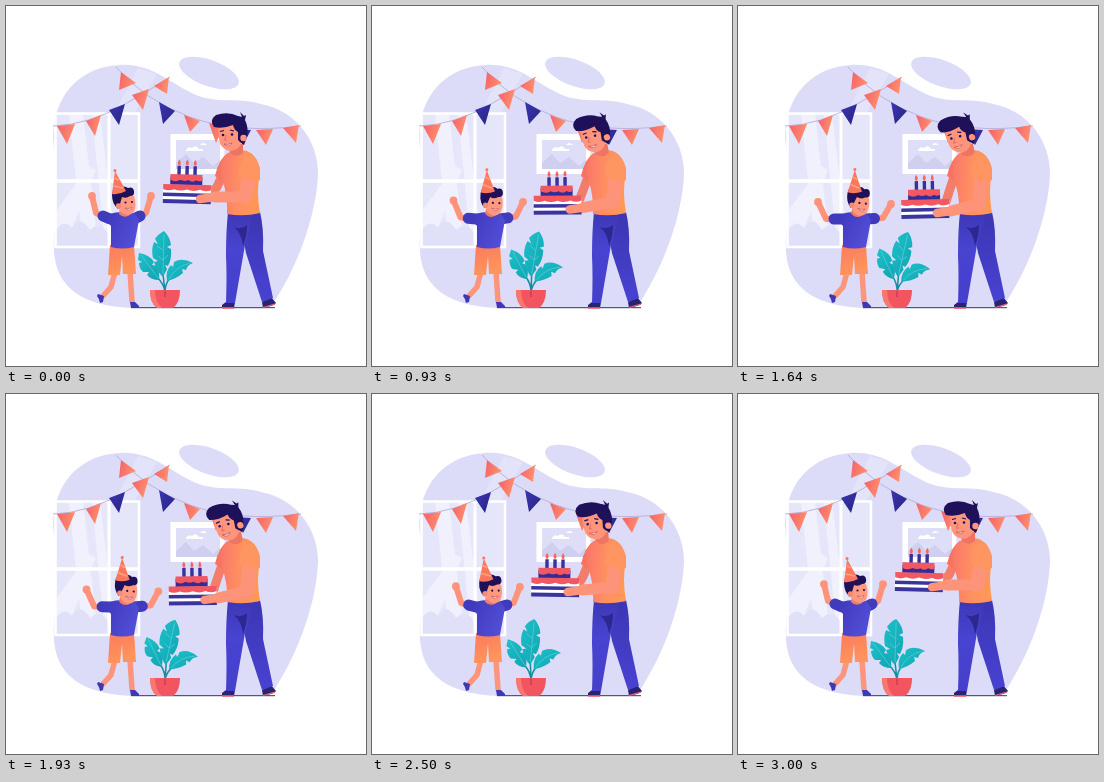
An HTML page that plays this animation: 360x360 px, repeating every 3.07 s.

```html
<!DOCTYPE html>
<html lang="en">
<head>
<meta charset="utf-8">
<title>Birthday cake</title>
<style>
html, body { margin: 0; width: 100%; height: 100%; overflow: hidden; background: #fff; }
svg { display: block; width: 100vw; height: 100vh; }
.limb { fill: none; stroke-linecap: round; stroke-linejoin: round; }
</style>
</head>
<body>
<svg viewBox="0 0 360 360">
  <defs>
    <linearGradient id="shirt" x1="0" y1="0.2" x2="1" y2="0.3">
      <stop offset="0" stop-color="#f9776a"/><stop offset=".5" stop-color="#ff8f61"/><stop offset="1" stop-color="#ff9857"/>
    </linearGradient>
    <linearGradient id="flag" x1="0" y1="0" x2="1" y2="0.3">
      <stop offset="0" stop-color="#f4606a"/><stop offset="1" stop-color="#ff8e6c"/>
    </linearGradient>
    <linearGradient id="navy" x1="0" y1="0" x2="1" y2="1">
      <stop offset="0" stop-color="#3b35b4"/><stop offset="1" stop-color="#29247f"/>
    </linearGradient>
    <linearGradient id="frontLeg" x1="0" y1="0" x2="0" y2="1">
      <stop offset="0" stop-color="#3d37b6"/><stop offset=".4" stop-color="#4843d0"/><stop offset="1" stop-color="#4540cc"/>
    </linearGradient>
    <linearGradient id="backLeg" x1="0" y1="0" x2="0" y2="1">
      <stop offset="0" stop-color="#3c36b3"/><stop offset="1" stop-color="#4842d2"/>
    </linearGradient>
    <linearGradient id="kidShirt" x1="0" y1="0" x2="1" y2="0.5">
      <stop offset="0" stop-color="#3d38bb"/><stop offset="1" stop-color="#524dd6"/>
    </linearGradient>
    <linearGradient id="shorts" x1="0" y1="0" x2="0.3" y2="1">
      <stop offset="0" stop-color="#fb7a5d"/><stop offset="1" stop-color="#ff955c"/>
    </linearGradient>
    <linearGradient id="teal" x1="0" y1="0" x2="1" y2="1">
      <stop offset="0" stop-color="#1cc0c8"/><stop offset="1" stop-color="#12a5b3"/>
    </linearGradient>
    <clipPath id="panes"><rect x="50" y="108" width="82" height="133"/></clipPath>
  </defs>

  <path fill="#dcdcf8" d="M48 120C52 86 76 61 113 59C147 57 164 78 190 89C213 98 232 91 255 98C288 104 312 133 312 167C311 207 292 262 264 302H128C90 301 51 290 48 246C46 219 55 197 53 171C51 151 45 138 48 120Z"/>
  <ellipse cx="203" cy="67" rx="31.5" ry="13" transform="rotate(20 203 67)" fill="#dcdcf8"/>
  <path fill="#e3e3fa" d="M132 62L151 68L128 108H108Z"/>

  <g id="window">
    <rect x="50" y="108" width="82" height="133" fill="#e6e6fa"/>
    <g clip-path="url(#panes)">
      <path fill="#f1f1fd" d="M63 108H77L92 241H77ZM86 108H94L110 241H99ZM50 205L83 160L90 164L58 241H50Z"/>
      <path fill="#e0e0f8" d="M50 241V224Q58 212 66 222Q74 208 84 224Q94 214 102 227L106 241Z"/>
    </g>
    <g fill="none" stroke="#fff">
      <rect x="49.5" y="107.5" width="83.5" height="133.5" stroke-width="2.5"/>
      <path d="M103 108V241" stroke-width="3"/>
      <path d="M49 175H133" stroke-width="3.5"/>
    </g>
  </g>

  <g id="picture">
    <rect x="164.500" y="128" width="54" height="40" fill="#fff"/>
    <rect x="170" y="134" width="44" height="29" fill="#dedef8"/>
    <path fill="#cfcff0" d="M170 163V157L180 148L188 157L197 151L207 160L214 154V163Z"/>
    <path fill="#fff" d="M180 144q2-4 6-2q4-4 7 1h4v2h-17zM194 139q3-4 7 0z"/>
  </g>

  <path fill="none" stroke="#b8b6dc" stroke-width="1" d="M47 120Q82 119 119 98T164 71M110 61Q138 94 184 111T295 120"/>
  <g id="flags"></g>

  <path d="M125 301.700H269" stroke="#393469" stroke-width="1"/>

  <g id="plant">
    <path class="limb" stroke="#128f9f" stroke-width="1.500" d="M159 286L157 268M159 286Q158 278 151 271M159 286Q159 278 164 272"/>
    <g fill="url(#teal)">
      <path d="M133 247Q144 249 148 256L146 259L151 260Q154 267 153 274Q145 274 141 269L143 266L137 266Q133 262 133 257L136 256L132 254Z"/>
      <path d="M161 275Q159 265 165 259L167 261L168 256Q176 251 187 257Q181 259 180 264L176 263L177 267Q170 273 161 275Z"/>
      <path d="M158 225Q164 231 165 239L161 241L165 243Q166 253 162 260L159 259L161 263L157 271Q151 266 148 256L152 255L147 252Q145 243 148 236L152 238L149 233Q152 228 158 225Z"/>
    </g>
    <path fill="none" stroke="#63d5da" stroke-width=".6" d="M135 249L152 272M163 273Q169 261 184 257M158 228L157 268M157 244L151 240M157 254L152 250M157 254L162 249"/>
  </g>
  <path fill="#f2555f" d="M144 284H174Q174 297 167 302H151Q144 297 144 284Z"/>
  <path fill="#fa7770" d="M144 284H149Q149 296 156 302H151Q144 297 144 284Z"/>
  <path stroke="#cb3e58" d="M159 285V291" stroke-width="1.500"/>

  <g id="kid">
    <path class="limb" stroke="#fd957c" stroke-width="5.500" d="M109 266L105 281L97 290"/>
    <path class="limb" stroke="#fd957c" stroke-width="5.500" d="M124 266L126 295"/>
    <path fill="#3d38b4" d="M92 288L98 290L97 296L94 297Q93 292 91 290ZM124 296H129L133 300V302H125Z"/>
    <path fill="url(#shorts)" d="M104 239H128L130 268H117L116 250L114 269H102Z"/>
    <path id="kidLeft" class="limb" stroke="#fd937a" stroke-width="6"/>
    <path id="kidRight" class="limb" stroke="#fd937a" stroke-width="6"/>
    <path id="kidSleeves" class="limb" stroke="#403bbd" stroke-width="11" stroke-linecap="butt"/>
    <path fill="url(#kidShirt)" d="M103 208Q117 204 129 208L133 214L128 241Q116 244 105 241V220L99 213Z"/>
    <circle id="fistLeft" r="3.900" fill="#fd937a"/>
    <circle id="fistRight" r="3.900" fill="#fd937a"/>
    <g id="kidHead">
      <path fill="#f27b67" d="M114 201H124V209Q118 213 113 208Z"/>
      <path fill="#ff9a80" d="M111 190Q121 186 128 190Q131 199 128 206Q122 212 115 206Q110 200 111 190Z"/>
      <path fill="#1f1159" d="M106 189Q106 181 113 182Q118 179 122 182Q127 180 128 185Q129 190 124 190Q120 193 116 191L114 198L112 203Q106 198 106 189Z"/>
      <circle cx="112.500" cy="200" r="2.700" fill="#f78a72"/>
      <g fill="#1f1159"><circle cx="119.500" cy="196.500" r="1.100"/><circle cx="126" cy="196" r="1.100"/></g>
      <path fill="#fff" stroke="#bd4058" stroke-width=".6" d="M119 202Q123 203.500 126 201.500Q124 206.500 119 202Z"/>
      <path fill="#fb765f" d="M109 165L120 185Q113 189 106 188Z"/>
      <path stroke="#ffa376" stroke-width="1.700" d="M108.500 172L113 174M107.500 180L117 182"/>
      <circle cx="109" cy="164.500" r="1.500" fill="#fa7464"/>
    </g>
  </g>

  <g id="dad">
    <path fill="#292471" d="M216 299L220 296H229L228 302H216ZM256 296L265 291L270 297L268 299L257 302Z"/>
    <path stroke="#f4636b" stroke-width="1.300" d="M216 302H228M257 301.500L269 298"/>
    <path fill="url(#backLeg)" d="M231 206H254Q258 222 257 245L267 292L256 296L240 247L235 220Z"/>
    <path fill="url(#frontLeg)" d="M222 206H247Q244 224 239 239L229 297H220Q221 270 220 250Q220 225 222 206Z"/>
    <path fill="#2d278f" d="M228 221Q235 224 241 219Q241 230 237 240Q236 228 228 221Z"/>
    <path id="dadFar" class="limb" stroke="#f27e69" stroke-width="9"/>
    <path fill="#f6735f" d="M222 147Q213 152 209 170L219 177L227 165Z"/>
    <path fill="url(#shirt)" d="M222 147Q230 142 241 145Q253 150 254 167Q250 185 254 207Q238 211 221 208Q222 190 216 173Q211 157 222 147Z"/>
    <g id="dadHead">
      <path fill="#ee7562" d="M222 138H237V147Q231 153 224 147Z"/>
      <path fill="#ff967c" d="M212 118H236V134Q234 145 224 145Q214 143 213 133Z"/>
      <path fill="#1f1159" d="M208 121Q203 114 210 109Q222 105 232 110L236 111L234 106L238 110L240 109L239 114Q243 122 241 131L238 139L234 136L232 134L232 126Q228 124 227 119Q217 123 208 121Z"/>
      <circle cx="237.500" cy="132" r="3.200" fill="#ff967c"/>
      <g fill="#1f1159"><circle cx="217" cy="129" r="1.300"/><circle cx="226" cy="128.500" r="1.300"/></g>
      <path fill="none" stroke="#1f1159" stroke-width="1.200" d="M214 125.500L218 124.500M224 124L228 125"/>
      <path fill="none" stroke="#e66b60" d="M220 129L218.500 134H221"/>
      <path fill="#fff" stroke="#b83a52" stroke-width=".6" d="M218 138Q222 139.500 226 137Q223 142.500 218 138Z"/>
    </g>
  </g>

  <g id="cake">
    <g id="candles"></g>
    <path fill="#322c96" d="M164 171H196V179H164Z"/>
    <path fill="#f25862" d="M164 168.500H196V174Q193 176 190 174Q186 177 182 174Q178 176 174 174Q169 177 164 174Z"/>
    <rect x="157" y="180" width="48" height="17.500" fill="#fff"/>
    <path fill="#3a349f" d="M157 187H205V190.500H157ZM157 193.500H205V197.500H157Z"/>
    <path fill="#f25862" d="M157 178.500H205V183.500Q199 186 194 183.500Q187 186 181 183.500Q174 186 168 183.500Q162 186 157 183.500Z"/>
  </g>
  <path id="dadUpper" class="limb" stroke="#fd947a" stroke-width="14"/>
  <path id="dadFore" class="limb" stroke="#fd947a" stroke-width="11"/>
  <path id="dadHand" class="limb" stroke="#fd947a" stroke-width="8.500"/>
  <path fill="#ff9560" d="M239 149Q250 148 254 162L254 174Q244 177 233 170Q233 157 239 149Z"/>
</svg>

<script>
const LOOP = 3070;
const STEPS = 43;
const TRAVEL = 1400;
const el = id => document.getElementById(id);
const set = (id, attrs) => {
  for (const [name, value] of Object.entries(attrs)) el(id).setAttribute(name, value);
};
const mix = (a, b, k) => a + (b - a) * k;
const mixPoint = (a, b, k) => a.map((v, i) => mix(v, b[i], k));
const line = (...points) => "M" + points.map(p => p.join(" ")).join("L");

// Each pennant: two corners on the string, then its tip.
const pennants = [
  "51 120 69 118 61 138", "80 115 95 109 89 130", "103 104 119 98 113 119",
  "148 80 163 71 161 88", "115 66 130 77 113 84", "126 89 143 83 137 104",
  "153 96 169 105 157 118", "178 109 194 115 184 126", "203 117 218 121 210 137",
  "228 123 245 124 237 139", "250 124 267 123 260 139", "277 122 293 119 290 137"
];
const navyPennants = [2, 6, 9];
el("flags").innerHTML = pennants.map((points, i) =>
  `<polygon points="${points}" fill="url(#${navyPennants.includes(i) ? "navy" : "flag"})"/>`).join("");

el("candles").innerHTML = [172.5, 180.5, 188.5].map(x => `
  <rect x="${x - 1.7}" y="160" width="3.400" height="12" fill="#37309d"/>
  <path d="M${x} 153.500Q${x + 3} 158 ${x} 160Q${x - 3} 158 ${x} 153.500Z" fill="#f7635d"/>`).join("");

function drawKidArm(side, shoulder, elbows, hands, k) {
  const elbow = mixPoint(...elbows, k);
  const hand = mixPoint(...hands, k);
  set("kid" + side, { d: line(shoulder, elbow, hand) });
  set("fist" + side, { cx: hand[0], cy: hand[1] });
  return line(shoulder, mixPoint(shoulder, elbow, .5));
}

// Eases out to the far pose, rests there briefly and eases back.
function swing(time) {
  const travelled = Math.min(time, LOOP - time, TRAVEL) / TRAVEL;
  return (1 - Math.cos(Math.PI * travelled)) / 2;
}

function draw(time) {
  const step = Math.floor((time % LOOP) / LOOP * STEPS);
  const k = swing(step / STEPS * LOOP);

  set("plant", { transform: `rotate(${11.5 * k} 159 286)` });
  set("kidHead", { transform: `rotate(${10.5 * k} 118 207)` });
  set("dadHead", { transform: `rotate(${-12 * k} 232 148)` });
  set("cake", { transform: `translate(${6.3 * k} ${15 * k}) rotate(${mix(1.5, -1, k)} 180 188)` });

  const sleeves =
    drawKidArm("Left", [104, 213], [[90, 207], [88, 213]], [[86, 190], [80, 196]], k) +
    drawKidArm("Right", [128, 213], [[140, 207], [145, 212]], [[145, 190], [153, 198]], k);
  set("kidSleeves", { d: sleeves });

  const elbow = mixPoint([239, 191], [241, 198], k);
  const wrist = mixPoint([209, 191], [213, 205], k);
  const hand = mixPoint([194, 193], [199, 207], k);
  set("dadFar", { d: line([217, 168], mixPoint([211, 181], [211, 186], k), mixPoint([205, 187], [206, 202], k)) });
  set("dadUpper", { d: line([244, 168], elbow) });
  set("dadFore", { d: line(elbow, wrist) });
  set("dadHand", { d: line(wrist, hand) });
}

const start = performance.now();
function tick() {
  draw(performance.now() - start);
  requestAnimationFrame(tick);
}
tick();
</script>
</body>
</html>
```
